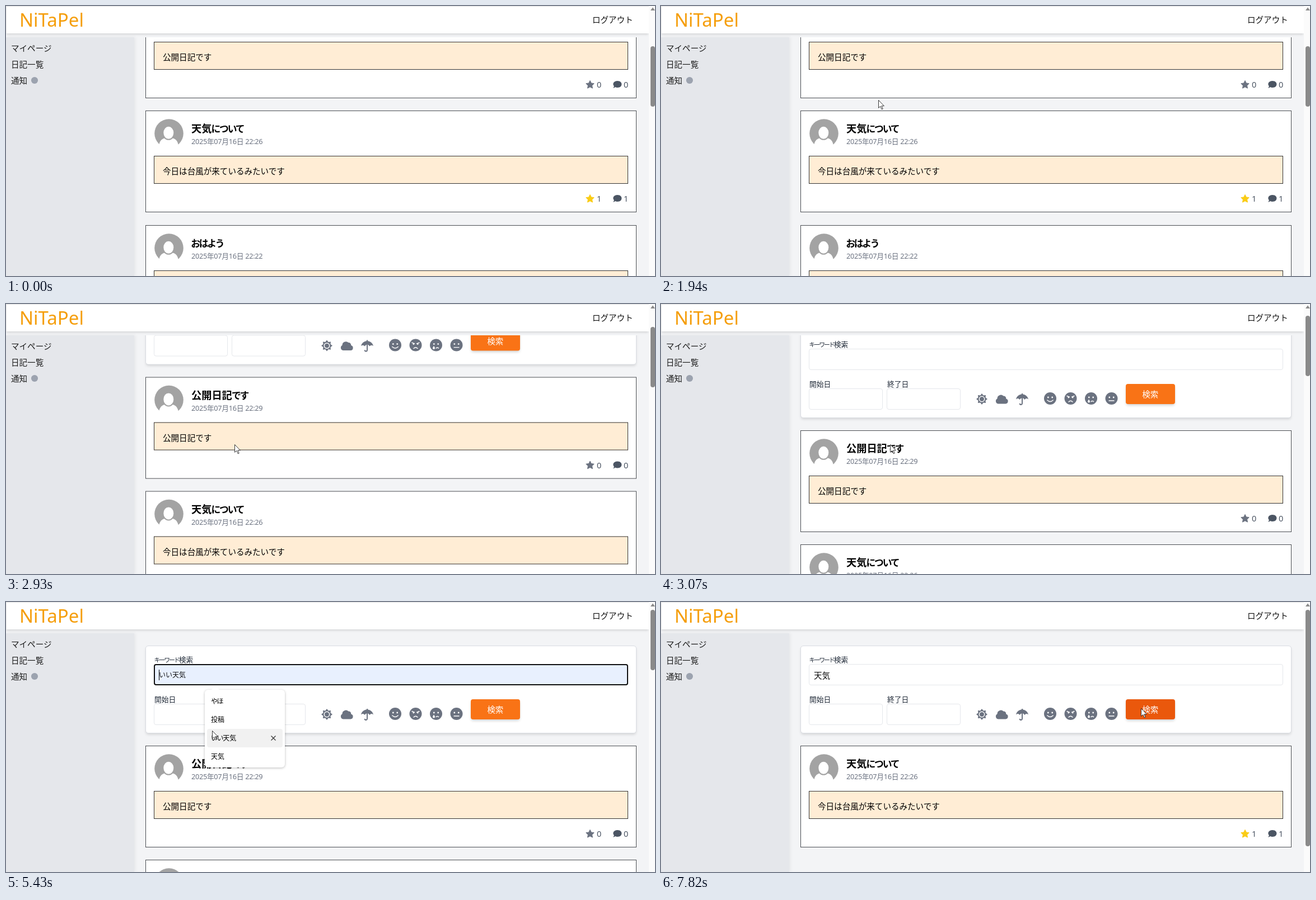
Animation of 1159x483 px, one loop 8 s. Source, as an HTML page:

```html
<!DOCTYPE html>
<html lang="ja">
<head>
<meta charset="utf-8">
<title>日記検索</title>
<style>
html, body { margin: 0; width: 100%; height: 100%; overflow: hidden; }
body { position: relative; background: #f3f4f6; color: #111; font: 14.56px/20px "Noto Sans", "Noto Sans CJK JP", "Noto Sans CJK", sans-serif; }
div, svg { position: absolute; box-sizing: border-box; white-space: nowrap; }
svg { overflow: visible; }
.hidden { visibility: hidden; }

.view { left: 0; top: 56px; width: 1148px; height: 427px; overflow: hidden; }
.page { left: 0; top: -56px; width: 1148px; height: 900px; }
.header { left: 0; top: 0; width: 1148px; height: 49px; background: #fff; border-top: 1px solid #e3e3e3; border-left: 1px solid #e8e8e8; box-shadow: 0 3px 4px -1px #0002; }
.brand { left: 23px; top: 4px; font-size: 33px; line-height: 40px; color: #f59e0b; }
.side { left: 0; top: 56px; width: 229px; height: 427px; background: #e5e7eb; box-shadow: 2px 0 6px #0000000f; color: #1c1c1c; }
.side div { left: 9px; }
.side .dot { left: 45px; top: 71px; width: 11.5px; height: 11.5px; border-radius: 50%; background: #9ca3af; }
.track { left: 1148px; top: 0; width: 11px; height: 483px; background: #fbfbfb; }
.thumb { left: 3px; top: 14px; width: 8px; height: 108px; border-radius: 4px; background: #8a8a8a; }

.search { left: 249px; top: 78px; width: 877px; height: 157px; background: #fff; border: 1px solid #d9dce2; border-radius: 5px; box-shadow: 0 3px 5px -1px #0002; }
.label { font-size: 12.74px; font-weight: 500; color: #1f2937; }
.label i { font-size: .85em; letter-spacing: -.18em; margin-left: -.05em; }
.input { border: 1px solid #e5e7eb; border-radius: 4px; background: #fff; height: 38px; }
.input.auto { background: #e8f0fe; }
.input.focus { outline: 2px solid #101010; outline-offset: -2px; }
.value { left: 8px; top: 9px; }
.caret { top: 121px; width: 1.5px; height: 19px; background: #000; }
.button { left: 830px; top: 173.5px; width: 87.5px; height: 36.5px; border-radius: 4px; background: #f97316; color: #fff; text-align: center; line-height: 37px; box-shadow: 0 3px 5px -1px #0003; }
.button.hover { background: #ea580c; }

.card { left: 249px; width: 877px; height: 182px; background: #fff; border: 1px solid #4a4d52; }
.title { left: 81px; top: 21px; font-size: 18.2px; font-weight: 700; color: #000; }
.title i { font-size: .92em; letter-spacing: -.13em; margin-left: -.05em; }
.date { left: 81px; top: 43.5px; font-size: 12.74px; letter-spacing: -.3px; color: #6b7280; }
.body { left: 14px; top: 80px; width: 847px; height: 50px; border: 1px solid #333; background: #ffedd5; padding: 16px 15px; color: #000; }
.count { top: 146px; color: #4b5563; }
.avatar { left: 14.5px; top: 14px; }
i { font-style: normal; }

.menu { left: 355px; top: 157px; width: 143px; height: 139px; border-radius: 6px; background: #fff; box-shadow: 0 1px 4px #0004; }
.menu svg { left: 11px; top: -7px; }
.option { left: 4px; width: 135px; height: 33px; border-radius: 4px; padding-left: 7px; font-size: 12px; font-weight: 500; line-height: 33px; color: #000; }
.option i { letter-spacing: -.12em; }
.option.on { background: #f1f1f1; }
.option svg { left: 114px; top: 12px; visibility: hidden; }
.option.on svg { visibility: inherit; }
.pointer { left: 0; top: 0; width: 0; height: 0; }
.halo { left: -11.5px; top: -11.5px; width: 23px; height: 23px; border-radius: 50%; background: #ffff0085; }
</style>
</head>
<body>
<div class="view">
  <div class="page" id="page">
    <div class="search"></div>
    <div class="label" style="left:265px;top:92.5px">キーワード検索</div>
    <div class="input" id="field" style="left:264px;top:111px;width:847px"><div class="value" id="value"></div></div>
    <div class="label" style="left:265px;top:163.5px">開始日</div>
    <div class="label" style="left:404px;top:163.5px">終了日</div>
    <div class="input" style="left:264px;top:181.5px;width:132px"></div>
    <div class="input" style="left:403px;top:181.5px;width:132px"></div>
    <svg id="icons" width="1" height="1" style="left:0;top:0" fill="#6b7280"></svg>
    <div class="button" id="button">検索</div>
  </div>
</div>
<div class="side">
  <div style="top:9px">マイページ</div>
  <div style="top:38px">日記一覧</div>
  <div style="top:67px">通知</div>
  <div class="dot"></div>
</div>
<div class="header">
  <div class="brand">NiTaPel</div>
  <div style="left:1046px;top:13px">ログアウト</div>
</div>
<div class="track">
  <svg width="11" height="11" style="left:0;top:0"><path d="M3 8 L7 2.5 L11 8Z" fill="#8a8a8a"/></svg>
  <div class="thumb" id="thumb"></div>
</div>
<div class="caret" id="caret"></div>
<div class="menu" id="menu"><svg width="16" height="8"><path d="M0 8 L8 0 L16 8Z" fill="#fff"/></svg></div>
<div class="pointer" id="pointer">
  <div class="halo" id="halo"></div>
  <svg id="arrow" width="12" height="18"><path d="M.5 .5V14.3L3.8 11.4L6.2 16.8L8.2 16L5.9 10.8H10.4Z" fill="#fff" stroke="#222" stroke-width=".9"/></svg>
  <svg id="beam" width="9" height="15" style="left:-3px;top:-7px"><path d="M.5 .5H3.5L4.5 1.5L5.5 .5H8.5M4.5 1.5V13.5M.5 14.5H3.5L4.5 13.5L5.5 14.5H8.5" fill="none" stroke="#333"/></svg>
</div>
<script>
const $ = id => document.getElementById(id);
const LOOP = 8000, CARD_STEP = 204.5;
const options = ['やほ', '投稿', 'いい天気', '天気'];
const kana = text => text.replace(/[ぁ-ヿ]+/g, '<i>$&</i>');

function star(points, outer, inner) {
  return Array.from({ length: points * 2 }, (_, i) => {
    const r = i % 2 ? inner : outer, a = i * Math.PI / points;
    return `${(r * Math.sin(a)).toFixed(2)},${(-r * Math.cos(a)).toFixed(2)}`;
  }).join(' ');
}

function card([title, time, text, likes, notes], i) {
  const el = document.createElement('div');
  el.className = 'card';
  el.style.top = Math.round(256.6 + i * CARD_STEP) + 'px';
  el.innerHTML = `
    <svg class="avatar" width="52" height="52">
      <circle cx="26" cy="26" r="25.8" fill="#a3a3a3"/>
      <path d="M7.5 53Q8 36 19 34.5Q26 40 32 34.5Q43 36 43.5 53Z" fill="#fff"/>
      <ellipse cx="25.3" cy="24.8" rx="10" ry="12" fill="#fff" stroke="#a3a3a3" stroke-width="2"/>
    </svg>
    <div class="title">${kana(title)}</div>
    <div class="date">2025年07月16日 ${time}</div>
    <div class="body">${text}</div>
    <svg width="1" height="1" style="left:0;top:0">
      <polygon points="${star(5, 7.6, 3.8)}" transform="translate(793 157)" fill="${likes ? '#facc15' : '#6b7280'}" stroke="${likes ? '#facc15' : '#6b7280'}" stroke-linejoin="round"/>
      <path d="M842 150C852 150 852 162 842 162Q839.5 162 838 161Q836.500 162.500 834 162.600Q836 161 835.800 159.300C832.500 155.500 835 150 842 150Z" fill="#4b5563"/>
    </svg>
    <div class="count" style="left:805px">${likes}</div>
    <div class="count" style="left:853px">${notes}</div>`;
  $('page').append(el);
  return el;
}

const cards = [
  ['公開日記です', '22:29', '公開日記です', 0, 0],
  ['天気について', '22:26', '今日は台風が来ているみたいです', 1, 1],
  ['おはよう', '22:22', '', 0, 0]
].map(card);

document.querySelectorAll('.label').forEach(el => el.innerHTML = kana(el.textContent));

const rows = options.map((text, i) => {
  const el = document.createElement('div');
  el.className = 'option';
  el.style.top = 3.5 + i * 33 + 'px';
  el.innerHTML = kana(text) + '<svg width="9" height="9"><path d="M.5 .5L8.5 8.5M8.5 .5L.5 8.5" stroke="#333" stroke-width="1.2"/></svg>';
  $('menu').append(el);
  return el;
});

const eyes = '<circle cx="-3.7" cy="-2" r="1.4" fill="#fff" stroke="none"/><circle cx="3.7" cy="-2" r="1.4" fill="#fff" stroke="none"/>';
const faces = [
  '<path d="M-5.200 3Q0 8 5.200 3"/>',
  '<path d="M-6.500 -4.500L-2 -2.700M6.500 -4.500L2 -2.700M-3.500 6Q0 2.500 3.500 6"/>',
  '<path d="M0 5.500Q2.500 3.500 4.500 5.500"/><path d="M-4 1.500Q-6 4.500 -6 5.500A2 2 0 0 0 -2 5.500Q-2 4.500 -4 1.500Z" fill="#fff" stroke="none"/>',
  '<path d="M-4.500 4H4.500"/>'
];
$('icons').innerHTML = `
  <g transform="translate(573 201)"><polygon points="${star(8, 10, 7)}"/><circle r="4.700" fill="none" stroke="#fff" stroke-width="1.500"/></g>
  <path d="M602 209.500A5 5 0 0 1 600.500 200.200A6.500 6.500 0 0 1 611.500 195.500A4.500 4.500 0 0 1 616.300 200.500A4.600 4.600 0 0 1 615.500 209.500Z"/>
  <path d="M634 201.500C635 196 640 192.800 644 192.600V191H646V192.600C650 192.800 655 196 656 201.500Q652 198.500 649.500 202Q647 199 645 199Q643 199 640.500 202Q638 198.500 634 201.500Z"/>
  <path d="M645 199V208.300Q645 211 642.800 211Q640.800 211 640.600 208.800" fill="none" stroke="#6b7280" stroke-width="2"/>
  ${faces.map((face, i) => `<g transform="translate(${695 + i * 36.5} 200)"><circle r="11"/><g fill="none" stroke="#fff" stroke-width="1.400" stroke-linecap="round">${eyes}${face}</g></g>`).join('')}`;

// Tracks: [ms, value, ...]
const pointerPath = [
  [710, 731, 470], [920, 590, 372], [1130, 465, 290], [1340, 385, 237], [1470, 366, 226],
  [1610, 367, 214], [1780, 376, 188], [1950, 388, 168], [2080, 394, 150], [2180, 400, 205],
  [2290, 404, 249], [2640, 407, 251], [2780, 407, 251], [3056, 409, 251],
  [3330, 409, 251], [3480, 382, 210], [3610, 338, 150], [3740, 328, 132],
  [4775, 328, 132], [4850, 331, 132], [5255, 331, 132], [5330, 355, 198], [5400, 368, 230],
  [5540, 376, 260], [5700, 379, 265], [6450, 379, 265], [6650, 470, 246],
  [6900, 680, 208], [7110, 815, 192], [7290, 857, 190]
];
const scrollPath = [[2640, 274], [2710, 262], [2780, 224.5], [2920, 125], [3056, 31], [3125, 3], [3194, 0]];

function sample(track, t) {
  const next = track.findIndex(key => key[0] > t);
  if (next < 0) return track[track.length - 1].slice(1);
  if (next === 0) return track[0].slice(1);
  const a = track[next - 1], b = track[next], p = (t - a[0]) / (b[0] - a[0]);
  return a.slice(1).map((v, i) => v + (b[i + 1] - v) * p);
}

const within = (t, ...spans) => spans.some(([from, to]) => t >= from && t < to);
const show = (el, on) => el.classList.toggle('hidden', !on);

function render(t) {
  const tick = 710 + 69 * Math.floor((t - 710) / 69 + .3);
  const [x, y] = sample(pointerPath, tick);
  const [scroll] = sample(scrollPath, tick);
  const found = t >= 7710, chosen = t >= 5970;
  const menuOpen = within(t, [4150, 6040]);
  const hover = menuOpen && x >= 355 ? Math.min(3, Math.floor((y - 160.5) / 33)) : -1;

  $('page').style.transform = `translateY(${-scroll}px)`;
  $('thumb').style.top = 14 + scroll * .2117 + 'px';
  $('thumb').style.height = (found ? 423 : 108) + 'px';
  cards.forEach((el, i) => show(el, !found || i === 1));
  cards[1].style.transform = found ? 'translateY(-204px)' : '';

  show($('menu'), menuOpen);
  rows.forEach((el, i) => el.classList.toggle('on', i === hover));
  $('value').textContent = chosen ? '天気' : options[hover] || '';
  $('value').style.fontSize = chosen ? '' : '12px';
  $('field').classList.toggle('auto', !found && (chosen || hover >= 0));
  $('field').classList.toggle('focus', within(t, [4090, 7420]));
  $('caret').style.left = (chosen ? 301.5 : 272.5) + 'px';
  show($('caret'), within(t, [4090, 4620], [5160, 5690], [5970, 6520], [7050, 7420]));
  $('button').classList.toggle('hover', x > 830 && y > 174 && y < 210);

  const inField = scroll === 0 && y > 111 && y < 149 && x > 264;
  $('pointer').style.transform = `translate(${Math.round(x)}px,${Math.round(y)}px)`;
  show($('arrow'), t >= 710 && !inField);
  show($('beam'), inField);
  show($('halo'), within(t, [4020, 4220], [5970, 6110], [7420, 7560]));
}

function frame() {
  render(performance.now() % LOOP);
  requestAnimationFrame(frame);
}
frame();
</script>
</body>
</html>
```
